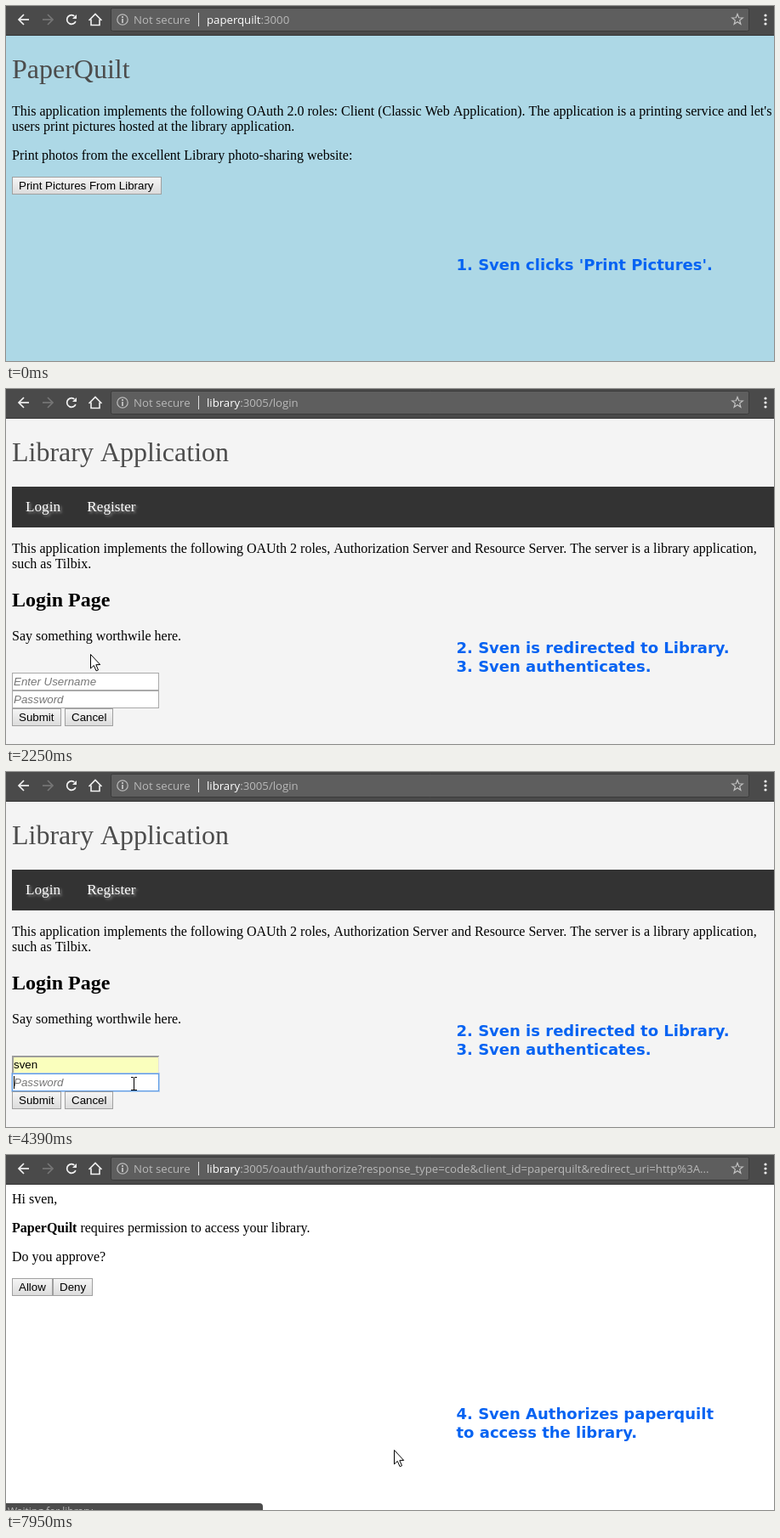
An HTML page with a canvas that plays this animation: 903x418 px, repeating every 8000 ms.

```html
<!DOCTYPE html>
<html lang="en">
<head>
<meta charset="utf-8">
<title>Authorization walkthrough</title>
<style>
html, body { margin: 0; width: 100%; height: 100%; overflow: hidden; }
canvas { display: block; width: 903px; height: 418px; }
</style>
</head>
<body>
<canvas id="stage" width="903" height="418"></canvas>
<script>
const ctx = document.getElementById('stage').getContext('2d');
const LOOP = 8000;
const SERIF = '"Liberation Serif", serif';
const ARIAL = '"Liberation Sans", sans-serif';
const UI = '"Open Sans", sans-serif';
const CAPTION = '"DejaVu Sans", sans-serif';
const BODY = '16px ' + SERIF;
const FIELD = '13.33px ' + ARIAL;
const DIM = '#b9b9b9';
const ICON = '#f2f2f2';

// Moments of the story in ms
const T = {
  press: 990, release: 1065, loading: 1140, login: 1290,
  list: 2810, pick: 3690, blur: 4310, focus: 4390,
  submit: 7480, submitted: 7558, waiting: 7637, consent: 7793
};
const KEYS = [5150, 5320, 5470, 5620, 5790, 5930, 6015, 6100];

// Pointer moves: start, end, steps, x, y, height of the arc
const MOVES = [
  [150, 910, 10, 154, 209, 0],
  [1290, 1610, 4, 141, 224, 0],
  [1760, 2400, 8, 92, 327, 0],
  [2690, 2750, 1, 91, 346, 0],
  [3230, 3540, 4, 80, 366, 0],
  [3690, 4000, 4, 167, 359, 0],
  [4000, 4150, 2, 150, 367, 0],
  [6590, 7230, 8, 46, 381, 40],
  [7560, 7950, 5, 456, 347, 0]
];

const within = (t, a, b) => t >= a && t < b;
const ease = p => (1 - Math.cos(Math.PI * p)) / 2;

function rect(x, y, w, h, color) {
  ctx.fillStyle = color;
  ctx.fillRect(x, y, w, h);
}

function frame(x, y, w, h, color) {
  ctx.strokeStyle = color;
  ctx.lineWidth = 1;
  ctx.strokeRect(x + 0.5, y + 0.5, w - 1, h - 1);
}

function text(str, x, y, font, color = '#000') {
  ctx.font = font;
  ctx.fillStyle = color;
  ctx.fillText(str, x, y);
  return x + ctx.measureText(str).width;
}

function line(points, color, width, close) {
  ctx.beginPath();
  points.forEach(([x, y]) => ctx.lineTo(x, y));
  if (close) ctx.closePath();
  ctx.strokeStyle = color;
  ctx.lineWidth = width;
  ctx.stroke();
}

function shape(points, color) {
  ctx.beginPath();
  points.forEach(([x, y]) => ctx.lineTo(x, y));
  ctx.fillStyle = color;
  ctx.fill();
}

function disc(x, y, r, color) {
  ctx.beginPath();
  ctx.arc(x, y, r, 0, 7);
  ctx.fillStyle = color;
  ctx.fill();
}

function pointerAt(t) {
  let x = 501, y = 385;
  for (const [a, b, n, toX, toY, arc] of MOVES) {
    if (t < a) break;
    const k = Math.min(n, Math.floor((t - a) / (b - a) * n + 1e-6));
    const p = ease(k / n);
    x += (toX - x) * p;
    y += (toY - y) * p - arc * 4 * p * (1 - p);
  }
  return { x: Math.round(x), y: Math.round(y) };
}

const over = (p, x, y, w, h) => p.x >= x && p.x < x + w && p.y >= y && p.y < y + h;

function arrow({ x, y }) {
  ctx.save();
  ctx.translate(x + 0.5, y + 0.5);
  const outline = [[0, 0], [0, 16.5], [3.8, 13], [6.6, 19.3], [9, 18.3], [6.3, 12.2], [11.2, 12]];
  shape(outline, '#fff');
  line(outline, '#000', 1, true);
  ctx.restore();
}

function beam({ x, y }) {
  rect(x, y - 7, 1, 15, '#000');
  for (const top of [y - 8, y + 7]) {
    rect(x - 3, top, 3, 1, '#000');
    rect(x + 1, top, 3, 1, '#000');
  }
}

function arrowIcon(x, dir, color) {
  line([[x - 6 * dir, 16], [x + 6 * dir, 16]], color, 1.7);
  line([[x, 10], [x + 6 * dir, 16], [x, 22]], color, 1.7);
}

function reloadIcon() {
  ctx.beginPath();
  ctx.arc(77, 16, 5.3, 0.4, 5.4);
  ctx.strokeStyle = ICON;
  ctx.lineWidth = 1.7;
  ctx.stroke();
  shape([[83, 10], [83, 15], [78, 15]], ICON);
}

function stopIcon() {
  line([[72, 11], [82, 21]], '#a3d2fa', 1.8);
  line([[82, 11], [72, 21]], '#a3d2fa', 1.8);
}

function star(cx, cy) {
  const points = Array.from({ length: 10 }, (_, i) => {
    const r = i % 2 ? 2.8 : 6.6;
    const a = Math.PI * (i / 5 - 0.5);
    return [cx + r * Math.cos(a), cy + r * Math.sin(a)];
  });
  line(points, '#c4c4c4', 1.2, true);
}

function toolbar(host, path, busy) {
  rect(0, 0, 903, 35, '#4a4a4a');
  rect(0, 34, 903, 1, '#333');
  ctx.beginPath();
  ctx.roundRect(123.5, 2.5, 750, 27, 2);
  ctx.fillStyle = '#5e5e5e';
  ctx.fill();
  ctx.strokeStyle = '#3b3b3b';
  ctx.lineWidth = 1;
  ctx.stroke();

  arrowIcon(21, -1, ICON);
  arrowIcon(49, 1, '#767676');
  busy ? stopIcon() : reloadIcon();
  line([[97.5, 17], [105, 9.5], [112.5, 17]], ICON, 1.6);
  line([[100, 15.5], [100, 22.5], [110, 22.5], [110, 15.5]], ICON, 1.6);

  ctx.beginPath();
  ctx.arc(137, 16, 6.2, 0, 7);
  ctx.strokeStyle = DIM;
  ctx.lineWidth = 1.3;
  ctx.stroke();
  rect(136, 12, 2, 2, DIM);
  rect(136, 15, 2, 5, DIM);

  const font = '13.2px ' + UI;
  text('Not secure', 150, 21, font, DIM);
  rect(226, 8, 1, 16, '#dedede');
  ctx.save();
  ctx.beginPath();
  ctx.rect(230, 0, 618, 34);
  ctx.clip();
  text(path, text(host, 236, 21, font, '#fff'), 21, font, DIM);
  ctx.restore();

  star(860, 16);
  for (const y of [11, 16, 21]) disc(893, y, 1.6, ICON);
}

function button(label, x, y, w, hover, pressed) {
  const fill = ctx.createLinearGradient(0, y, 0, y + 21);
  fill.addColorStop(0, pressed ? '#dcdcdc' : '#f6f6f6');
  fill.addColorStop(1, pressed ? '#efefef' : '#dbdbdb');
  rect(x, y, w, 21, fill);
  frame(x, y, w, 21, hover ? '#777' : '#a0a0a0');
  text(label, x + 8, y + 15, FIELD);
}

function field(y, { value, hint, filled, focused, caret }) {
  rect(7, y, 173, 21, filled ? '#faffbd' : '#fff');
  if (focused) {
    frame(6, y - 1, 175, 23, 'rgba(92, 155, 230, 0.4)');
    frame(7, y, 173, 21, '#5c9be6');
  } else if (filled) {
    rect(7, y, 173, 2, '#9c9c9c');
    rect(7, y, 2, 21, '#9c9c9c');
    rect(8, y + 20, 172, 1, '#e2e2e2');
    rect(179, y + 1, 1, 20, '#e2e2e2');
  } else {
    frame(7, y, 173, 21, '#a9a9a9');
  }
  let end = 9;
  if (value) end = text(value, 9, y + 15, FIELD);
  else text(hint, 9, y + 15, 'italic ' + FIELD, '#777');
  if (caret) rect(Math.floor(end), y + 3, 1, 15, '#000');
}

function suggestions(p) {
  rect(7, 355, 197, 70, '#fff');
  if (over(p, 7, 356, 180, 24)) rect(8, 356, 179, 24, '#cdcdcd');
  ['sven', 'administrator', 'sven@huvels.org'].forEach((name, i) =>
    text(name, 16, 372 + 24 * i, 'bold 11px ' + UI));
  rect(187, 356, 16, 62, '#f1f1f1');
  rect(187, 373, 15, 17, '#cdcdcd');
  line([[191, 367.5], [194.5, 364], [198, 367.5]], '#505050', 1.5);
  line([[191, 411.5], [194.5, 415], [198, 411.5]], '#505050', 1.5);
  frame(7, 355, 197, 70, '#000');
}

function caption(...lines) {
  lines.forEach((s, i) => text(s, 529.5, 311 + 22 * i, 'bold 18px ' + CAPTION, '#0663f2'));
}

function printPage(t, p) {
  rect(0, 0, 903, 418, '#add8e6');
  text('PaperQuilt', 7, 85, '32px ' + SERIF, '#4c4c4c');
  text("This application implements the following OAuth 2.0 roles: Client (Classic Web Application). The application is a printing service and let's", 7, 129, BODY);
  text('users print pictures hosted at the library application.', 7, 147, BODY);
  text('Print photos from the excellent Library photo-sharing website:', 7, 181, BODY);
  button('Print Pictures From Library', 7, 201, 176, over(p, 7, 201, 176, 21), within(t, T.press, T.release));
  caption("1. Sven clicks 'Print Pictures'.");
  toolbar('paperquilt', ':3000', t >= T.loading);
}

function navLink(label, x) {
  ctx.save();
  ctx.shadowColor = '#888';
  ctx.shadowBlur = 3;
  ctx.shadowOffsetX = 2;
  ctx.shadowOffsetY = 2;
  text(label, x, 144, '17.2px ' + SERIF, '#fff');
  ctx.restore();
}

function loginPage(t, p) {
  rect(0, 0, 903, 418, '#f4f4f4');
  text('Library Application', 7, 85, '32px ' + SERIF, '#4c4c4c');
  rect(7, 115, 896, 48, '#333');
  navLink('Login', 23);
  navLink('Register', 95.3);
  text('This application implements the following OAUth 2 roles, Authorization Server and Resource Server. The server is a library application,', 7, 193, BODY);
  text('such as Tilbix.', 7, 211, BODY);
  text('Login Page', 7, 256, 'bold 24px ' + SERIF);
  text('Say something worthwile here.', 7, 296, BODY);

  const open = within(t, T.list, T.pick);
  const named = t >= T.pick || (open && over(p, 7, 356, 180, 24));
  const typed = KEYS.filter(k => t >= k).length;
  const blinkOff = within(t, 4770, 5150) || within(t, 6670, 7150);
  field(334, {
    value: named ? 'sven' : '', hint: 'Enter Username', filled: named,
    focused: within(t, T.list, T.blur), caret: within(t, T.list, T.blur)
  });
  field(355, {
    value: '•'.repeat(typed), hint: 'Password',
    focused: t >= T.blur, caret: t >= T.focus && !blinkOff
  });
  button('Submit', 7, 376, 58, over(p, 7, 376, 58, 21), within(t, T.submit, T.submitted));
  button('Cancel', 69, 376, 57, over(p, 69, 376, 57, 21));
  if (open) suggestions(p);
  caption('2. Sven is redirected to Library.', '3. Sven authenticates.');
  toolbar('library', ':3005/login', t >= T.waiting);
}

function consentPage() {
  rect(0, 0, 903, 418, '#fff');
  text('Hi sven,', 7, 57, BODY);
  text(' requires permission to access your library.', text('PaperQuilt', 7, 91, 'bold ' + BODY), 91, BODY);
  text('Do you approve?', 7, 125, BODY);
  button('Allow', 7, 145, 48);
  button('Deny', 55, 145, 47);
  caption('4. Sven Authorizes paperquilt', 'to access the library.');
  toolbar('library', ':3005/oauth/authorize?response_type=code&client_id=paperquilt&redirect_uri=http%3A...');
  ctx.beginPath();
  ctx.roundRect(-4, 410, 306, 20, 4);
  ctx.fillStyle = '#4c4c4c';
  ctx.fill();
  text('Waiting for library...', 2, 424, '12px ' + UI, DIM);
}

function draw(t) {
  const p = pointerAt(t);
  const onLogin = within(t, T.login, T.consent);
  if (t < T.login) printPage(t, p);
  else if (onLogin) loginPage(t, p);
  else consentPage();
  if (t < 150) return;
  const fieldsHeight = within(t, T.list, T.pick) ? 21 : 42;
  if (onLogin && over(p, 7, 334, 173, fieldsHeight)) beam(p);
  else arrow(p);
}

const start = performance.now();
function tick() {
  draw((performance.now() - start) % LOOP);
  requestAnimationFrame(tick);
}
tick();
</script>
</body>
</html>
```
